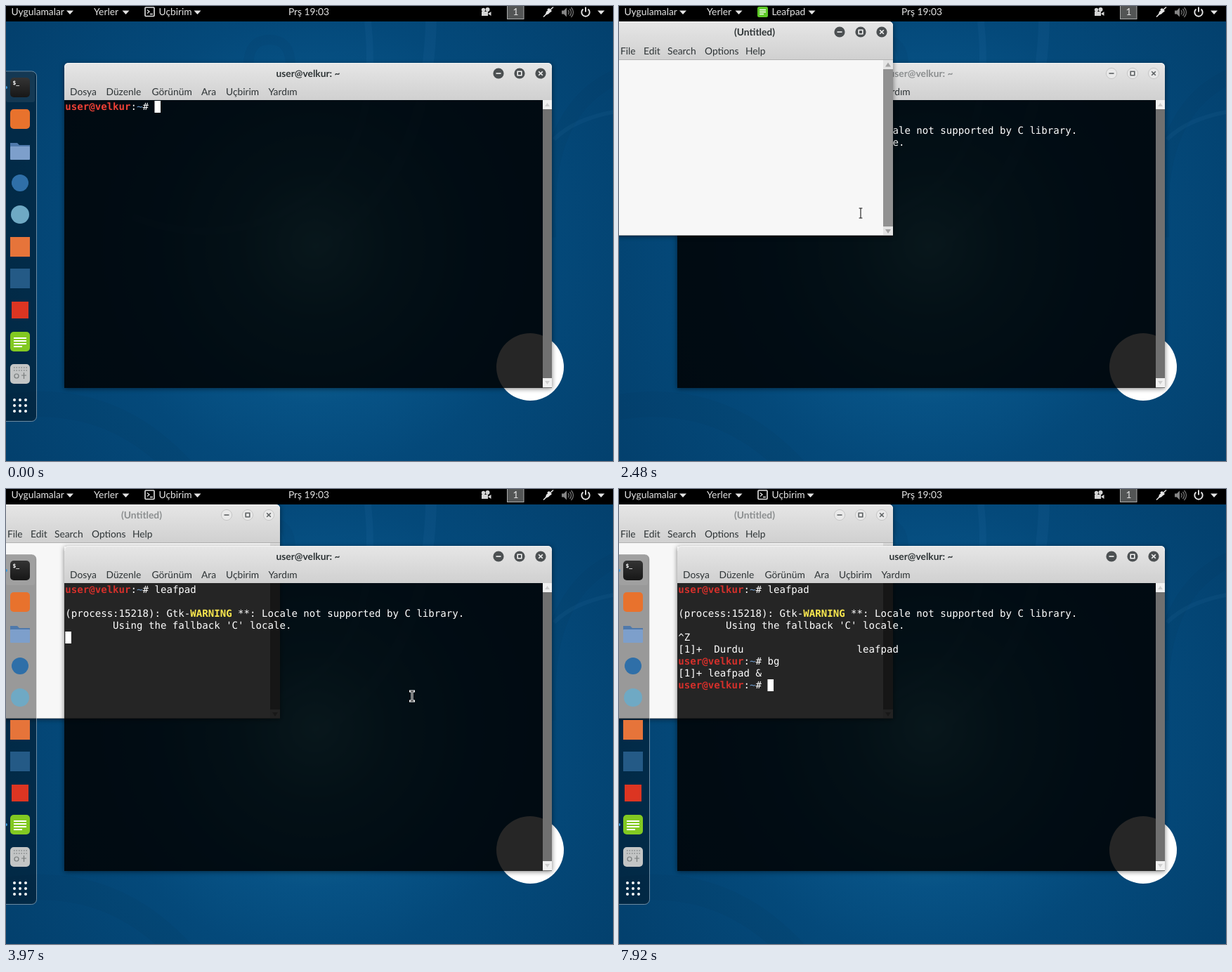
An HTML page for the animation above (8000 ms loop, 864 by 648 pixels).

```html
<!DOCTYPE html>
<html lang="tr">
<head>
<meta charset="utf-8">
<title>Terminal session</title>
<style>
  html, body { margin: 0; width: 100%; height: 100%; overflow: hidden; background: #03416f; }
  svg { display: block; width: 864px; height: 648px; }
  text { font-family: Lato, "Open Sans", sans-serif; font-size: 13.8px; text-rendering: geometricPrecision; white-space: pre; }
  .bar text { fill: #e4e4e4; }
  .menu text { fill: #2e3436; }
  .title { font-weight: bold; text-anchor: middle; fill: var(--ink); }
  .window { --ink: #2e3436; --disc: #4c5052; --rim: none; --sign: #f4f4f4; }
  .window.blurred { --ink: #8b8e8f; --disc: #e9e9e9; --rim: #c6c6c6; --sign: #5d6163; }
  .btn circle { fill: var(--disc); stroke: var(--rim); }
  .btn path { fill: none; stroke: var(--sign); stroke-width: 1.6; }
  .shadow { fill: #000; opacity: .5; filter: url(#soft); }
  #rows text { font-family: "DejaVu Sans Mono", monospace; font-size: 14.08px; fill: #fff; }
  #rows .who { fill: #ef4136; font-weight: bold; }
  #rows.late .who { fill: #d4302b; }
  #rows .dir { fill: #729fcf; }
  #rows .warn { fill: #fce94f; font-weight: bold; }
  .off { display: none; }
</style>
</head>
<body>
<svg viewBox="0 0 864 648">
  <defs>
    <radialGradient id="sky" gradientUnits="userSpaceOnUse" cx="440" cy="340" r="540">
      <stop offset="0" stop-color="#3599b8"/>
      <stop offset=".2" stop-color="#176c94"/>
      <stop offset=".42" stop-color="#075285"/>
      <stop offset=".6" stop-color="#04497a"/>
      <stop offset="1" stop-color="#03406d"/>
    </radialGradient>
    <linearGradient id="head" x2="0" y2="1">
      <stop offset="0" stop-color="#e6e6e6"/>
      <stop offset="1" stop-color="#d0d0d0"/>
    </linearGradient>
    <linearGradient id="dark" x2="0" y2="1">
      <stop offset="0" stop-color="#343434"/>
      <stop offset="1" stop-color="#171717"/>
    </linearGradient>
    <filter id="soft" x="-10%" y="-10%" width="120%" height="120%"><feGaussianBlur stdDeviation="3.500"/></filter>
    <!-- keeps the shadow from showing through the translucent body -->
    <clipPath id="aroundTerm"><path clip-rule="evenodd" d="M0 0H864V648H0zM83 82H777V544H83z"/></clipPath>
    <g id="buttons" class="btn">
      <circle r="7.600"/><path d="M-3.500 0h7"/>
      <g transform="translate(30)"><circle r="7.600"/><path d="M-2.800-2.800h5.600v5.600h-5.600z"/></g>
      <g transform="translate(60)"><circle r="7.600"/><path d="M-2.800-2.800l5.600 5.600m0-5.600l-5.600 5.600"/></g>
    </g>
    <path id="caretDown" d="M-5-2.500H5L0 3z" fill="#e4e4e4"/>
  </defs>

  <!-- wallpaper -->
  <rect width="864" height="648" fill="url(#sky)"/>
  <g fill="none" stroke="#002b52" stroke-opacity=".09">
    <path d="M-20 575Q140 540 250 660" stroke-width="36"/>
    <path d="M345 85Q345 48 375 48T405 85" stroke-width="14"/>
    <path d="M870 100Q760 150 772 330" stroke-width="22"/>
  </g>
  <g fill="none" stroke="#5fb4e0" stroke-opacity=".05">
    <path d="M515 22Q535 210 420 280T180 300" stroke-width="10"/>
    <path d="M605 22Q600 250 440 350" stroke-width="16"/>
    <path d="M780 190Q810 160 870 150" stroke-width="6"/>
  </g>
  <circle cx="746" cy="514" r="48" fill="#fff"/>

  <g id="windows">
    <g id="pad" class="window">
      <rect class="shadow" x="-4" y="24" width="394" height="304"/>
      <path d="M-4 22H384q6 0 6 6V77H-4z" fill="url(#head)"/>
      <path d="M-4 22.500H384q5.500 0 5.500 6" fill="none" stroke="#f5f5f5"/>
      <text class="title" x="193" y="41.500">(Untitled)</text>
      <use href="#buttons" x="314" y="37"/>
      <g class="menu">
        <text x="2" y="69">File</text><text x="35" y="69">Edit</text><text x="69" y="69">Search</text>
        <text x="122" y="69">Options</text><text x="180" y="69">Help</text>
      </g>
      <rect x="-4" y="77" width="394" height="250" fill="#f7f7f7"/>
      <rect x="376" y="77" width="14" height="250" fill="#919191"/>
      <path d="M376 77h14v13h-14zM376 314h14v13h-14z" fill="#e4e4e4"/>
      <path d="M379 86.500h8l-4-6zM379 318h8l-4 6z" fill="#a2a2a2"/>
      <path d="M-4 76.500H390M-4 326.500H390" stroke="#b2b2b2"/>
    </g>

    <g id="term" class="window">
      <g clip-path="url(#aroundTerm)"><rect class="shadow" x="83" y="83" width="694" height="462"/></g>
      <path d="M83 134V87q0-6 6-6H771q6 0 6 6V134z" fill="url(#head)"/>
      <path d="M83.500 88q0-6.500 6-6.500H771q5.500 0 5.500 6.500" fill="none" stroke="#f5f5f5"/>
      <text class="title" x="430" y="101">user@velkur: ~</text>
      <use href="#buttons" x="701" y="96"/>
      <g class="menu">
        <text x="91" y="127">Dosya</text><text x="142.500" y="127">Düzenle</text><text x="207.500" y="127">Görünüm</text>
        <text x="278" y="127">Ara</text><text x="313" y="127">Uçbirim</text><text x="373.500" y="127">Yardım</text>
      </g>
      <rect x="83" y="134" width="681" height="410" fill="#000" fill-opacity=".85"/>
      <rect x="764" y="134" width="13" height="410" fill="#707070"/>
      <path d="M764 134h13v13h-13zM764 530h13v13h-13z" fill="#f1f1f1"/>
      <path d="M767 143h7l-3.500-5zM767 534h7l-3.500 5z" fill="#cfcfcf"/>
      <g id="rows" xml:space="preserve"></g>
      <rect id="caret" width="8.600" height="17" fill="#fff"/>
    </g>
  </g>

  <g id="dock">
    <rect x="-8" y="93" width="51.500" height="498.500" rx="7" fill="#000" fill-opacity=".38" stroke="#fff" stroke-opacity=".42"/>
    <rect x="0" y="94" width="41" height="43" rx="3" fill="#fff" fill-opacity=".07"/>
    <circle cx="0" cy="116" r="2" fill="#3c9be0"/>
    <circle id="padDot" cx="0" cy="478" r="2" fill="#3c9be0"/>

    <rect x="6" y="102" width="28" height="28" rx="5" fill="url(#dark)"/>
    <text x="9.500" y="112" style="font:bold 8px 'DejaVu Sans Mono',monospace" fill="#fff">$_</text>
    <rect x="6" y="147" width="28" height="28" rx="5" fill="#e8722d"/>
    <path d="M6 195h10l3 3h15v8H6z" fill="#4f79ab"/>
    <rect x="6" y="200" width="28" height="19" rx="1" fill="#7d9fcb"/>
    <circle cx="20" cy="252" r="12" fill="#2f6fa8"/>
    <circle cx="20" cy="297" r="13" fill="#6fa9c4"/>
    <rect x="6" y="329" width="28" height="28" fill="#e6743a"/>
    <rect x="6" y="374" width="28" height="28" fill="#245a86"/>
    <rect x="8" y="421" width="24" height="24" fill="#dc3522"/>
    <rect x="6" y="464" width="28" height="28" rx="5" fill="#82c922"/>
    <path d="M11 473h18M11 477h18M11 481h18M11 485h12" stroke="#fff" stroke-width="2"/>
    <rect x="6" y="510" width="28" height="28" rx="5" fill="#c3c5c5"/>
    <path d="M11 515h19M11 519h19" stroke="#858888" stroke-width="1.500" stroke-dasharray="1.500 2"/>
    <g fill="none" stroke="#777b7b" stroke-width="1.200"><circle cx="15" cy="527" r="3"/><path d="M22 526h7M25.500 522v9"/></g>
    <path d="M12 561h17M12 569h17M12 577h17" stroke="#fff" stroke-width="4" stroke-linecap="round" stroke-dasharray="0 8"/>
  </g>

  <g class="bar">
    <rect width="864" height="22" fill="#000"/>
    <text x="7.500" y="13">Uygulamalar</text><use href="#caretDown" x="91" y="9"/>
    <text x="125" y="13">Yerler</text><use href="#caretDown" x="170.500" y="9"/>
    <g id="termApp">
      <rect x="198" y="2" width="13" height="12.500" rx="1" fill="none" stroke="#e4e4e4" stroke-width="1.600"/>
      <path d="M201 5.500l3 2.500-3 2.500M205 11.500h4" fill="none" stroke="#e4e4e4" stroke-width="1.300"/>
      <text x="217.500" y="13">Uçbirim</text><use href="#caretDown" x="272.500" y="9"/>
    </g>
    <g id="padApp">
      <rect x="197" y="1" width="15" height="15" rx="2.500" fill="#5dc926"/>
      <path d="M200 5.500h9M200 8.500h9M200 11.500h6" stroke="#fff" stroke-width="1.400"/>
      <text x="217.500" y="13">Leafpad</text><use href="#caretDown" x="274.500" y="9"/>
    </g>
    <text x="431" y="13" text-anchor="middle">Prş 19:03</text>
    <g fill="#d4d4d4"><circle cx="679.500" cy="5.500" r="2.700"/><circle cx="685.500" cy="5" r="3"/><path d="M677 8h9v6h-9zM686 11l4.500-3v6z"/></g>
    <rect x="713.500" y="-1" width="23.500" height="19.500" fill="#535555" stroke="#a9abab"/>
    <text x="725.500" y="13" text-anchor="middle">1</text>
    <path d="M765 15.500l4-4M774 6l5-4.500" stroke="#e4e4e4" stroke-width="1.600"/>
    <path d="M767.500 13l1.500-5 3-2.500 3 3-3 3zM770 5l3-2 4 4-2 2z" fill="#e4e4e4"/>
    <path d="M791 6.500h3l4-4v13l-4-4h-3z" fill="#858585"/>
    <path d="M800 6q2.500 3 0 6M802.500 4q4 5 0 10M804.500 2q6 7 0 14" fill="none" stroke="#737373" stroke-width="1.300"/>
    <path d="M821.500 4.500a5.700 5.700 0 1 0 7 0M825 1.500v7" fill="none" stroke="#e4e4e4" stroke-width="1.900"/>
    <use href="#caretDown" x="847" y="9"/>
  </g>

  <g id="beam" fill="none">
    <path d="M-2.500-7H2.500M0-7V7M-2.500 7H2.500" stroke="#fff" stroke-width="3" stroke-linecap="square"/>
    <path d="M-2.500-7H2.500M0-7V7M-2.500 7H2.500" stroke="#111" stroke-width="1.100"/>
  </g>
  <path id="arrow" d="M0 0V15L3.500 12 6 17 8.500 16 6 11H11z" fill="#111" stroke="#fff"/>
</svg>

<script>
const $ = id => document.getElementById(id);
const LOOP = 8000, LEFT = 84.3, TOP = 135, CELL = 8.477, LINE = 17;
const prompt = "user@velkur:~# ";
const session = [
  prompt + "leafpad",
  "",
  "(process:15218): Gtk-WARNING **: Locale not supported by C library.",
  " ".repeat(8) + "Using the fallback 'C' locale.",
  "^Z",
  "[1]+  Durdu".padEnd(30) + "leafpad",
  prompt + "bg",
  "[1]+ leafpad &",
  prompt
];

const at = (kind, x, y = 295) => ({ pointer: { kind, x, y } });
const hidden = { pointer: null };

// Each step lists only what changes at that time.
const steps = [
  [0, { row: 0, col: 15, caret: true, dock: true, front: "term", pad: false, ...hidden }],
  [70, at("arrow", 726, 630)],
  [140, at("beam", 612, 498)],
  [215, at("beam", 436, 366)],
  [290, at("beam", 344)],
  [610, { caret: false }],
  [920, { caret: true, ...hidden }],
  [1000, { col: 16 }],
  [1080, { col: 17 }],
  [1310, { col: 19 }],
  [1770, { col: 21 }],
  [1940, { col: 22 }],
  [2170, { row: 1, col: 0 }],
  [2275, { row: 4 }],
  [2390, at("beam", 344)],
  [2480, { pad: true, front: "pad", dock: false }],
  [3570, at("arrow", 384)],
  [3650, at("beam", 490)],
  [3730, at("beam", 578)],
  [3870, { front: "term" }],
  [3970, { dock: true }],
  [4440, { caret: false }],
  [4970, { caret: true }],
  [6230, { col: 2, ...hidden }],
  [6305, { row: 6, col: 0 }],
  [6380, { col: 15 }],
  [6930, { caret: false }],
  [7390, { caret: true, col: 16 }],
  [7540, { col: 17 }],
  [7920, { row: 8, col: 15 }]
];

const show = (id, on) => $(id).classList.toggle("off", !on);

function paint(line) {
  return line.replace("&", "&amp;")
    .replace(/^(\w+@\w+):~/, '<tspan class="who">$1</tspan>:<tspan class="dir">~</tspan>')
    .replace("WARNING", '<tspan class="warn">$&</tspan>');
}

function render(s) {
  $("rows").innerHTML = session.slice(0, s.row + 1).map((line, i) =>
    `<text x="${LEFT}" y="${TOP + 13 + LINE * i}">${paint(i < s.row ? line : line.slice(0, s.col))}</text>`
  ).join("");
  $("rows").classList.toggle("late", s.pad);
  $("caret").setAttribute("x", LEFT + CELL * s.col);
  $("caret").setAttribute("y", TOP + LINE * s.row);
  show("caret", s.caret);

  $("windows").append($(s.front));
  for (const id of ["term", "pad"]) {
    $(id).classList.toggle("blurred", s.front !== id);
    show(id + "App", s.front === id);
  }
  show("pad", s.pad);
  show("padDot", s.pad);
  show("dock", s.dock);

  for (const kind of ["beam", "arrow"]) {
    const on = s.pointer?.kind === kind;
    show(kind, on);
    if (on) $(kind).setAttribute("transform", `translate(${s.pointer.x} ${s.pointer.y})`);
  }
}

let shown = 0;
function tick() {
  const t = performance.now() % LOOP;
  const due = steps.filter(([start]) => start <= t);
  if (due.length !== shown) {
    shown = due.length;
    render(Object.assign({}, ...due.map(([, change]) => change)));
  }
  requestAnimationFrame(tick);
}
tick();
</script>
</body>
</html>
```
